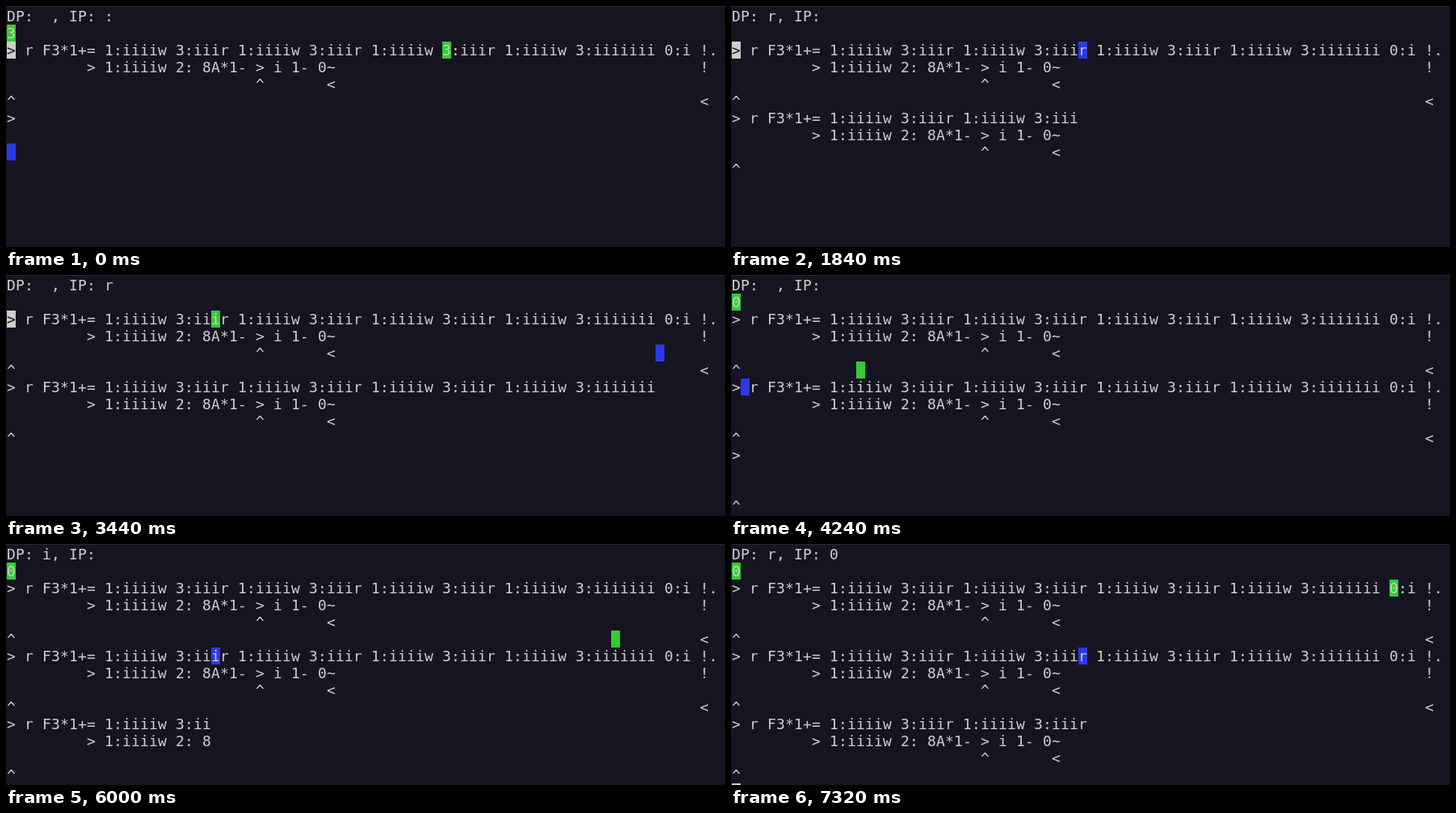
Recreate the animation shown at these times as an HTML page. Size 890 px wide and 298 px high, loop 7.42 s.

```html
<!DOCTYPE html>
<html lang="en">
<head>
<meta charset="utf-8">
<title>Self-copying grid program</title>
<style>
  html, body { margin: 0; width: 100%; height: 100%; overflow: hidden; background: #171421; }
  svg { display: block; width: 890px; height: 298px; }
  text { font: 18px "DejaVu Sans Mono", monospace; fill: #d0cfcc; white-space: pre; }
</style>
</head>
<body>
<svg id="stage" viewBox="0 0 890 298">
  <rect width="890" height="298" fill="#171421"/>
  <rect width="890" height="1" fill="#292731"/>
</svg>
<script>
const COLS = 80, ROWS = 12, CELL_W = 11, CELL_H = 21;
const FRAME = 40, LOOP = 7420, LAST = 183;
const GREEN = '#33cc33', BLUE = '#2a3ae8', LIGHT = '#d0cfcc', DARK = '#171421';

const at = (col, text) => ' '.repeat(col) + text;
const PROGRAM = [
  '> r F3*1+= ' + '1:iiiiw 3:iiir '.repeat(3) + '1:iiiiw 3:iiiiiii 0:i !.',
  at(9, '> 1:iiiiw 2: 8A*1- > i 1- 0~').padEnd(78) + '!',
  at(28, '^').padEnd(36) + '<',
  '^'.padEnd(78) + '<'
];

// Directions: 0 right, 1 down, 2 left, 3 up
const DX = [1, 0, -1, 0], DY = [0, 1, 0, -1];
const TURNS = { '>': 0, '!': 1, '<': 2, '^': 3 };
let vm;

function reset() {
  vm = {
    grid: Array.from({ length: ROWS }, (_, r) => [...(PROGRAM[r] || '').padEnd(COLS)]),
    ip: { x: 0, y: 0, dir: 0 },
    dp: { x: 0, y: 0, dir: 0 },
    stack: [],
    steps: 0
  };
}

const charAt = p => vm.grid[p.y]?.[p.x] ?? ' ';

function move(p) {
  p.x += DX[p.dir];
  p.y += DY[p.dir];
}

function step() {
  const { ip, dp, stack, grid } = vm;
  const op = charAt(ip);
  const pop = () => stack.pop() ?? 0;
  const top = () => stack[stack.length - 1];
  if (op in TURNS) ip.dir = TURNS[op];
  else if (/[0-9A-F]/.test(op)) stack.push(parseInt(op, 16));
  else if (op === ':') dp.dir = pop();
  else if (op === 'i') move(dp);
  else if (op === 'r') stack.push(charAt(dp).charCodeAt(0));
  else if (op === 'w') grid[dp.y][dp.x] = String.fromCharCode(pop());
  else if ('+-*'.includes(op)) {
    const b = pop(), a = pop();
    stack.push(op === '+' ? a + b : op === '-' ? a - b : a * b);
  }
  else if (op === '=') { if (pop() === top()) ip.dir = 1; }
  else if (op === '~') { if (pop() !== top()) ip.dir = 1; }
  move(ip);
  vm.steps++;
}

function runTo(target) {
  if (vm.steps > target) reset();
  while (vm.steps < target) step();
}

// Pace of the interpreter: [frame, steps]; it slows once the second copy begins.
const SECOND_COPY = 104.2;
const PACE = [[0, 49], [30, 4101], [62, 8534], [86, 11849],
  [SECOND_COPY, 14364], [126, 16124], [150, 18019], [LAST, 20756]];

function stepsAt(n) {
  const k = Math.max(1, PACE.findIndex(p => p[0] >= n));
  const [n0, s0] = PACE[k - 1], [n1, s1] = PACE[k];
  return Math.round(s0 + (s1 - s0) * (n - n0) / (n1 - n0));
}

const stage = document.getElementById('stage');
function add(tag, attrs) {
  const el = document.createElementNS('http://www.w3.org/2000/svg', tag);
  for (const key in attrs) el.setAttribute(key, attrs[key]);
  return stage.appendChild(el);
}

const left = col => 1 + col * CELL_W;
const topOf = row => 2 + row * CELL_H;
const xs = Array.from({ length: COLS }, (_, c) => left(c)).join(' ');
const box = (fill, width = CELL_W) => add('rect', { width, height: CELL_H, fill });
const line = row => add('text', { x: xs, y: topOf(row) + 17 });

const stackBox = box(GREEN), ipBox = box(GREEN), dpBox = box(BLUE);
const lines = Array.from({ length: ROWS + 2 }, (_, r) => line(r));
const cursorBox = box(LIGHT);
const cursorText = line(0);
cursorText.style.fill = DARK;

function place(el, col, row) {
  el.setAttribute('x', left(col));
  el.setAttribute('y', topOf(row));
}

function write(el, text) {
  const value = text.replace(/ /g, '\u00a0');
  if (el.textContent !== value) el.textContent = value;
}

const symbol = v => v < 16 ? v.toString(16).toUpperCase() : String.fromCharCode(v);

function cursorRow(n) {
  if (n > SECOND_COPY) return n % 9 === 3 ? 14 : -1;
  if (n > 6 && n % 42 === 6) return 10;
  return n % 5 === 2 ? 1 : 2;
}

function draw(n) {
  runTo(stepsAt(n));
  vm.grid.forEach((row, r) => write(lines[r + 2], row.join('').trimEnd()));
  place(ipBox, vm.ip.x, vm.ip.y + 2);
  place(dpBox, vm.dp.x, vm.dp.y + 2);

  // While the screen is being reprinted, the top lines are one step ahead.
  if (n < SECOND_COPY) step();
  const row = cursorRow(n);
  const stack = row === 1 ? '' : vm.stack.map(symbol).join('');
  write(lines[0], `DP: ${charAt(vm.dp)}, IP: ${charAt(vm.ip)}`);
  write(lines[1], stack);
  place(stackBox, 0, 1);
  stackBox.setAttribute('width', stack.length * CELL_W);

  const shown = row < 0 ? 'none' : '';
  cursorBox.style.display = cursorText.style.display = shown;
  place(cursorBox, 0, row);
  cursorText.setAttribute('y', topOf(row) + 17);
  write(cursorText, (lines[row]?.textContent || ' ')[0]);
}

let drawn = -1;
const start = performance.now();
function tick() {
  const t = (performance.now() - start) % LOOP;
  const n = Math.min(LAST, Math.floor(t / FRAME));
  if (n !== drawn) draw(drawn = n);
  requestAnimationFrame(tick);
}

reset();
tick();
</script>
</body>
</html>
```
